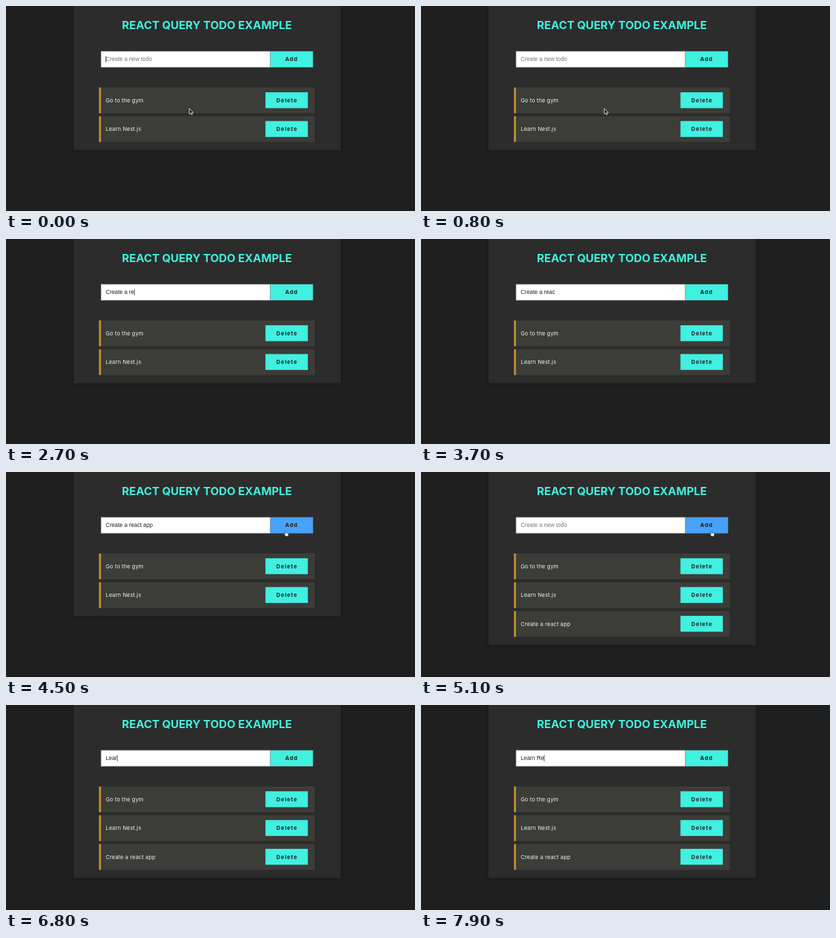
Animation of 600 by 302 pixels, one loop 8000 ms. Source, as an HTML page:

```html
<!DOCTYPE html>
<html lang="en">
<head>
<meta charset="utf-8">
<title>Todo list</title>
<style>
  html, body { margin: 0; width: 100%; height: 100%; overflow: hidden; background: #1f1f1f; }
  svg { display: block; width: 100vw; height: 100vh; }
  text { font: 8px Inter, sans-serif; white-space: pre; }
  .title { font-size: 16.3px; font-weight: 700; fill: #40f0e0; text-anchor: middle; }
  .field { font: 8.333px "Liberation Sans", Arial, sans-serif; fill: #222; }
  .field.hint { fill: #757575; }
  .label { fill: #f2f2f2; letter-spacing: .18px; }
  .action { font-weight: 700; fill: #222; letter-spacing: 1px; }
  .button { fill: #40f0e0; }
  .button.hover { fill: #48a2f8; }
  #panel { fill: #2c2c2c; filter: drop-shadow(0 1px 2px rgba(0, 0, 0, .22)); }
</style>
</head>
<body>
<svg viewBox="0 0 600 302" preserveAspectRatio="none">
  <rect id="panel" x="99" y="-10" width="392" height="222.4"/>
  <text class="title" x="294.7" y="34">REACT QUERY TODO EXAMPLE</text>

  <rect x="139.3" y="66.8" width="248.6" height="23.4" fill="#fff" stroke="#8c8c8c" stroke-width=".7"/>
  <text id="field" class="field" x="146.2" y="81.3"></text>
  <rect id="caret" y="73.6" width=".7" height="9.6" fill="#111"/>
  <rect id="add" class="button" x="387.9" y="66.8" width="62.4" height="23.4" stroke="#777" stroke-width=".4"/>
  <text class="action" x="409.5" y="81.3">Add</text>

  <g id="list"></g>

  <path id="arrow" d="M0 0V8.2L1.9 6.5 3.2 9.2 4.5 8.6 3.3 6H5.8Z" fill="#111" stroke="#fff" stroke-width=".8"/>
  <path id="hand" d="M1.5 .6Q2.3 -.2 3 .6L3.5 3 5.8 3.4Q7 3.6 6.9 5L6.2 8H2.8L.4 5.2Q0 4.4 .9 4.3L2 4.8Z"
        fill="#fff" stroke="#222" stroke-width=".6"/>
  <path id="beam" d="M-1.4 -4.5Q0 -4.5 0 -3.6Q0 -4.5 1.4 -4.5M0 -3.6V3.6M-1.4 4.5Q0 4.5 0 3.6Q0 4.5 1.4 4.5"
        fill="none" stroke="#333" stroke-width=".7"/>
</svg>
<script>
const LOOP = 8000, STEP = 100;
const ADDED = 4900, REFOCUS = 5700;
const ROW_PITCH = 42.4;
const labels = ["Go to the gym", "Learn Nest.js", "Create a react app"];

// Each entry: moment in ms, contents of the input from then on
const typing = [
  [0, ""], [1000, "C"], [1200, "Cr"], [1300, "Cre"], [1500, "Crea"],
  [2000, "Creat"], [2100, "Create"], [2200, "Create "], [2300, "Create a"],
  [2400, "Create a "], [2500, "Create a r"], [2600, "Create a re"],
  [2800, "Create a rea"], [3000, "Create a reac"], [3800, "Create a react"],
  [3900, "Create a react a"], [4000, "Create a react app"], [ADDED, ""],
  [6300, "L"], [6500, "Le"], [6600, "Lea"], [6700, "Lear"], [6900, "Learn"],
  [7100, "Learn "], [7600, "Learn R"], [7800, "Learn Re"]
];

// Each entry: moment in ms, pointer x, y
const path = [
  [4200, 269, 151], [4500, 407.6, 86.8], [4700, 416, 87], [5000, 423.6, 86.8],
  [5100, 423.6, 86.8], [5500, 300, 79], [5700, 269, 79], [6300, 269, 79]
];

const $ = id => document.getElementById(id);
const show = (el, on) => el.setAttribute("visibility", on ? "visible" : "hidden");
const lastBefore = (table, t) => table.filter(row => row[0] <= t).pop();

$("list").innerHTML = labels.map((label, i) => `
  <g transform="translate(0 ${120 + i * ROW_PITCH})">
    <rect x="136.4" width="316.6" height="38" fill="#3c3c39"/>
    <rect x="136.4" width="2.9" height="38" fill="#c98f31"/>
    <text class="label" x="146.2" y="21.9">${label}</text>
    <rect class="button" x="380.6" y="7.1" width="62.2" height="23.4"/>
    <text class="action" x="396.6" y="21.9">Delete</text>
  </g>`).join("");
const newRow = $("list").lastElementChild;

function pointerAt(t) {
  if (t < 1000) return [269, 151];
  const next = path.findIndex(row => row[0] > t);
  if (next < 1) return null;
  const [t0, x0, y0] = path[next - 1], [t1, x1, y1] = path[next];
  const k = (t - t0) / (t1 - t0), ease = k * k * (3 - 2 * k);
  return [x0 + (x1 - x0) * ease, y0 + (y1 - y0) * ease];
}

function drawPointer(t) {
  const point = pointerAt(t);
  let kind = "";
  if (point) {
    const [x, y] = point;
    const inBar = y > 64 && y < 90;
    kind = inBar && x > 386 && x < 450 ? "hand" : inBar && x > 139 ? "beam" : "arrow";
    $(kind).setAttribute("transform", `translate(${x} ${y})`);
  }
  for (const id of ["arrow", "hand", "beam"]) show($(id), id === kind);
  $("add").classList.toggle("hover", kind === "hand");
}

function drawField(t) {
  const field = $("field");
  const [since, value] = lastBefore(typing, t);
  field.textContent = value || "Create a new todo";
  field.classList.toggle("hint", !value);
  const width = value ? field.getComputedTextLength() : 0;
  $("caret").setAttribute("x", 146.2 + width);
  const blinkStart = t >= REFOCUS ? Math.max(since, REFOCUS) : since;
  const focused = t < 4500 || t >= REFOCUS;
  show($("caret"), focused && (t - blinkStart) % 1000 < 500);
}

function render(now) {
  const t = Math.floor(now % LOOP / STEP) * STEP;
  const added = t >= ADDED;
  newRow.style.display = added ? "" : "none";
  $("panel").setAttribute("height", 222.4 + (added ? ROW_PITCH : 0));
  drawField(t);
  drawPointer(t);
}

const start = performance.now();
function tick() {
  render(performance.now() - start);
  requestAnimationFrame(tick);
}
tick();
</script>
</body>
</html>
```
